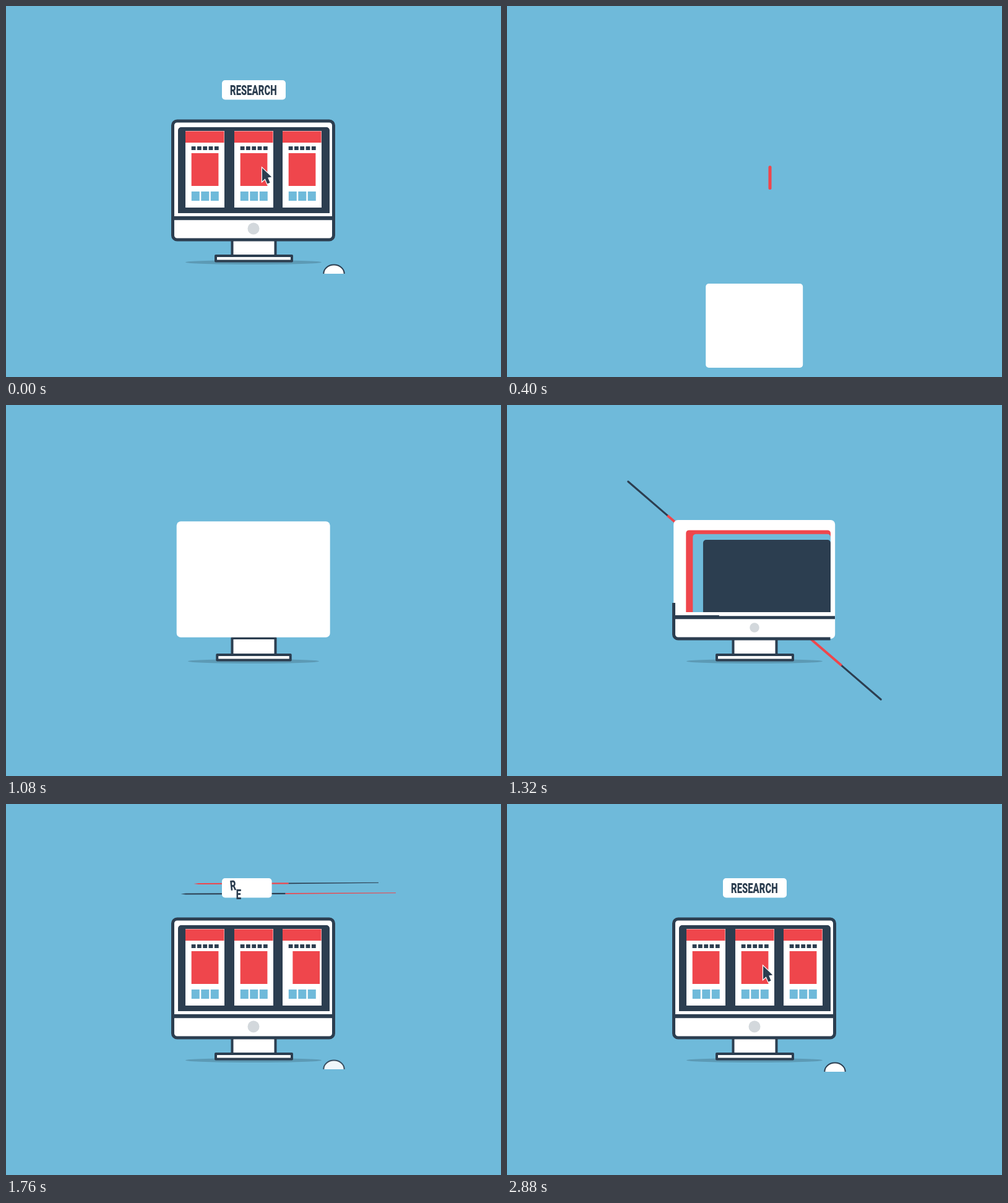
An HTML page with a canvas that plays this animation: 800 by 600 pixels, repeating every 3360 ms.

```html
<!DOCTYPE html>
<html lang="en">
<head>
<meta charset="utf-8">
<title>Research</title>
<style>
  html, body { margin: 0; width: 100%; height: 100%; overflow: hidden; background: #6fbada; }
  canvas { display: block; width: 800px; height: 600px; }
</style>
</head>
<body>
<canvas id="stage"></canvas>
<script>
const LOOP = 3360, STEP = 40, REST = 2880;
const BG = '#6fbada', DARK = '#2c3e50', RED = '#ef464c', WHITE = '#fff';
const canvas = document.getElementById('stage');
const ctx = canvas.getContext('2d');
const ratio = window.devicePixelRatio || 1;
canvas.width = 800 * ratio;
canvas.height = 600 * ratio;

const clamp = v => Math.max(0, Math.min(1, v));
const span = (t, start, length) => clamp((t - start) / length);
const out = (p, power = 3) => 1 - (1 - p) ** power;
const smooth = p => p * p * (3 - 2 * p);
const hump = p => Math.sin(Math.PI * p);
const mix = (a, b, p) => a + (b - a) * p;
const radians = degrees => degrees * Math.PI / 180;

function box(x, y, w, h, color, radius = 0) {
  if (w <= 0 || h <= 0) return;
  ctx.fillStyle = color;
  ctx.beginPath();
  ctx.roundRect(x, y, w, h, radius);
  ctx.fill();
}

function line(x1, y1, x2, y2, color, width, cap = 'butt') {
  ctx.strokeStyle = color;
  ctx.lineWidth = width;
  ctx.lineCap = cap;
  ctx.beginPath();
  ctx.moveTo(x1, y1);
  ctx.lineTo(x2, y2);
  ctx.stroke();
}

function shape(points, color) {
  ctx.fillStyle = color;
  ctx.beginPath();
  points.forEach(([x, y]) => ctx.lineTo(x, y));
  ctx.closePath();
  ctx.fill();
}

function ellipse(x, y, rx, ry, color) {
  ctx.fillStyle = color;
  ctx.beginPath();
  ctx.ellipse(x, y, rx, ry, 0, 0, 2 * Math.PI);
  ctx.fill();
}

function scoped(draw) {
  ctx.save();
  draw();
  ctx.restore();
}

// Height of the card's centre: fall, bounce, toss to a peak, drop onto the stand
function bodyY(t, h) {
  if (t < 360) return mix(-120, 507, span(t, 80, 280) ** 2);
  if (t < 440) return 585 - h / 2;
  if (t < 840) return mix(507, 126, out(span(t, 440, 400), 2));
  return mix(126, 282, span(t, 840, 240) ** 2);
}

function body(t) {
  const grow = out(span(t, 1000, 160));
  const squash = 22 * hump(span(t, 360, 100));
  const w = mix(157, 261, grow);
  const h = mix(157, 192, grow) - squash;
  // A square looks the same a quarter turn on, so the toss ends upright
  const angle = t < 680 ? 0 : -90 * (1 - smooth(span(t, 680, 370)));
  scoped(() => {
    ctx.translate(399.7 - 2 * hump(span(t, 560, 400)), bodyY(t, h));
    ctx.rotate(radians(angle));
    box(-w / 2, -h / 2, w, h, WHITE, mix(5, 7, grow));
  });
}

function streak(t, x, reach, start, color) {
  const head = reach * out(span(t, start, 160), 2);
  const tail = reach * span(t, start + 60, 207);
  if (head - tail > 5) line(x, tail + 2.5, x, head - 2.5, color, 5, 'round');
}

function burst(t) {
  const head = 302 * out(span(t, 1160, 304));
  const mid = Math.min(head, 302 * span(t, 1160, 260));
  const tail = Math.min(mid, 302 * span(t, 1200, 320));
  for (const side of [-1, 1]) {
    const point = d => [400 + side * 0.757 * d, 300 + side * 0.653 * d];
    if (head > mid) line(...point(mid), ...point(head), DARK, 3, 'round');
    if (mid > tail) line(...point(tail), ...point(mid), RED, 4);
  }
}

function framed(x, y, w, h) {
  box(x, y, w, h, WHITE);
  ctx.strokeStyle = DARK;
  ctx.lineWidth = 4;
  ctx.lineJoin = 'round';
  ctx.strokeRect(x, y, w, h);
}

function stand(t) {
  const p = out(span(t, 1000, 120));
  if (!p) return;
  ellipse(400, 414.5, 110 * p, 3.6, '#5c9ab5');
  framed(365.5, 404 - 28 * p, 70, 28 * p);
  framed(400.5 - 61.5 * p, 404, 123 * p, 8.5);
}

function outline(t) {
  const p = span(t, 1240, 240);
  if (!p) return;
  const l = 269.5, r = 529.5, top = 186, bottom = 378;
  scoped(() => {
    ctx.strokeStyle = DARK;
    ctx.lineWidth = 5;
    ctx.setLineDash([924 * p, 2000]);
    ctx.beginPath();
    ctx.moveTo(l, 320);
    ctx.arcTo(l, bottom, r, bottom, 7);
    ctx.arcTo(r, bottom, r, top, 7);
    ctx.arcTo(r, top, l, top, 7);
    ctx.arcTo(l, top, l, 320, 7);
    ctx.closePath();
    ctx.stroke();
  });
}

function page(t, x, start) {
  const rise = out(span(t, start, 160));
  if (!rise) return;
  scoped(() => {
    ctx.translate(x, 140 * (1 - rise));
    ctx.beginPath();
    ctx.rect(0, 202, 63, 124);
    ctx.clip();
    box(0, 202, 63, 124, WHITE);
    box(0, 202.5, 62.5 * out(span(t, start + 40, 120)), 18.5, RED);
    for (let i = 0; i < 5; i++) {
      const w = 6.8 * out(span(t, start + 60 + i * 12, 80));
      box(13.1 + i * 9.3 - w / 2, 227, w, 6, DARK);
    }
    for (let i = 0; i < 3; i++) {
      const h = 15 * out(span(t, start + 80 + i * 20, 80));
      box(9.8 + i * 15.5, 315 - h, 13, h, BG);
    }
    const slide = 60 * (1 - out(span(t, start + 80, 180), 2));
    box(9.7 + slide, 238, 43.7, 53, RED);
  });
}

function screen(t) {
  if (t < 1160) return;
  scoped(() => {
    const corners = [5, 5, 0, 0];
    ctx.beginPath();
    ctx.roundRect(278, 196, 245, 139, corners);
    ctx.clip();
    [RED, BG, DARK].forEach((color, i) => {
      const p = out(span(t, 1166 + i * 22, 240));
      box(523 - 245 * p, 335 - 139 * p, 245 * p, 139 * p, color, corners);
    });
    for (let i = 0; i < 3; i++) page(t, 290 + Math.round(i * 78.6), 1400 + i * 80);
  });
  line(269.5, 343.8, 269.5 + 260.5 * span(t, 1200, 100), 343.8, DARK, 5);
  line(269.5, 341.2, 269.5 + 260.5 * span(t, 1280, 142), 341.2, DARK, 2.4);
  const r = 9.5 * out(span(t, 1200, 210), 2);
  ellipse(400, 360, r, r, '#d3d8dc');
}

// A two-coloured line shot leftwards, thinning towards its tail
function dart(t, start, from, y, front, back) {
  const l = mix(from, 220, out(span(t, start, 300), 2));
  const r = mix(from, 220, span(t, 1760, 160));
  const mid = Math.min(r, mix(from, 220, span(t, start, 420)));
  if (r - l < 2) return;
  const tip = Math.min(l + 8, mid);
  shape([[mid, y - 1], [r, y - 1.8], [r, y - 0.8], [mid, y + 0.8]], back);
  shape([[l, y + 0.6], [tip, y - 0.5], [mid, y - 1.2], [mid, y + 1], [tip, y + 1.5]], front);
}

function letters(t) {
  const condense = 0.66;
  let x = 362;
  ctx.font = '900 22.5px Roboto, "Liberation Sans", sans-serif';
  ctx.textAlign = 'center';
  ctx.fillStyle = DARK;
  [...'RESEARCH'].forEach((char, i) => {
    const width = ctx.measureText(char).width * condense;
    const age = t - 1620 - i * 130;
    if (age >= 0) scoped(() => {
      const dy = 10.5 * Math.cos(Math.PI * Math.min(age, 330) / 220);
      ctx.translate(x + width / 2, 136 + dy);
      ctx.rotate(radians(1.4 * Math.min(0, dy)));
      ctx.scale(condense, 1);
      ctx.fillText(char, 0, 8);
    });
    x += width;
  });
}

function label(t) {
  dart(t, 1600, 602, 128.5, RED, DARK);
  dart(t, 1577, 630, 145, DARK, RED);
  box(349, 120, 103 * out(span(t, 1600, 300), 2), 31.5, WHITE, 5);
  letters(t);
}

function mouse(t) {
  const p = out(span(t, 1680, 120), 2);
  if (!p) return;
  const press = 1 - 0.06 * hump(span(t, 2560, 140));
  scoped(() => {
    ctx.globalAlpha = p;
    ctx.translate(530, 433 - 36 * (1 - p));
    ctx.beginPath();
    ctx.ellipse(0, 0, 16.7, 14.5 * press, 0, Math.PI, 2 * Math.PI);
    ctx.fillStyle = WHITE;
    ctx.fill();
    ctx.strokeStyle = DARK;
    ctx.lineWidth = 2;
    ctx.lineCap = 'butt';
    ctx.stroke();
  });
}

function cursor(t) {
  const enter = out(span(t, 2000, 240));
  if (!enter) return;
  const across = span(t, 2280, 320);
  const x = mix(430, 387, enter) + 27 * smooth(across) - 24 * hump(across);
  const y = mix(300, 264.5, enter) - 3 * across + 8 * hump(across);
  scoped(() => {
    ctx.translate(x, y);
    ctx.scale(enter, enter);
    ctx.lineJoin = 'miter';
    ctx.strokeStyle = WHITE;
    ctx.lineWidth = 2.4;
    shape([[0, 0.5], [0, 22], [4.8, 17.8], [8.3, 26], [12.6, 24.2], [9.2, 16], [15.2, 15]], DARK);
    ctx.stroke();
    ctx.fill();
  });
}

function draw(now) {
  let t = Math.floor((now % LOOP) / STEP) * STEP;
  if (t === 0) t = REST;
  ctx.setTransform(ratio, 0, 0, ratio, 0, 0);
  box(0, 0, 800, 600, BG);
  streak(t, 375, 220, 100, DARK);
  streak(t, 425, 297, 160, RED);
  burst(t);
  stand(t);
  body(t);
  screen(t);
  outline(t);
  label(t);
  mouse(t);
  cursor(t);
}

const began = performance.now();
function tick() {
  draw(performance.now() - began);
  requestAnimationFrame(tick);
}
tick();
</script>
</body>
</html>
```
